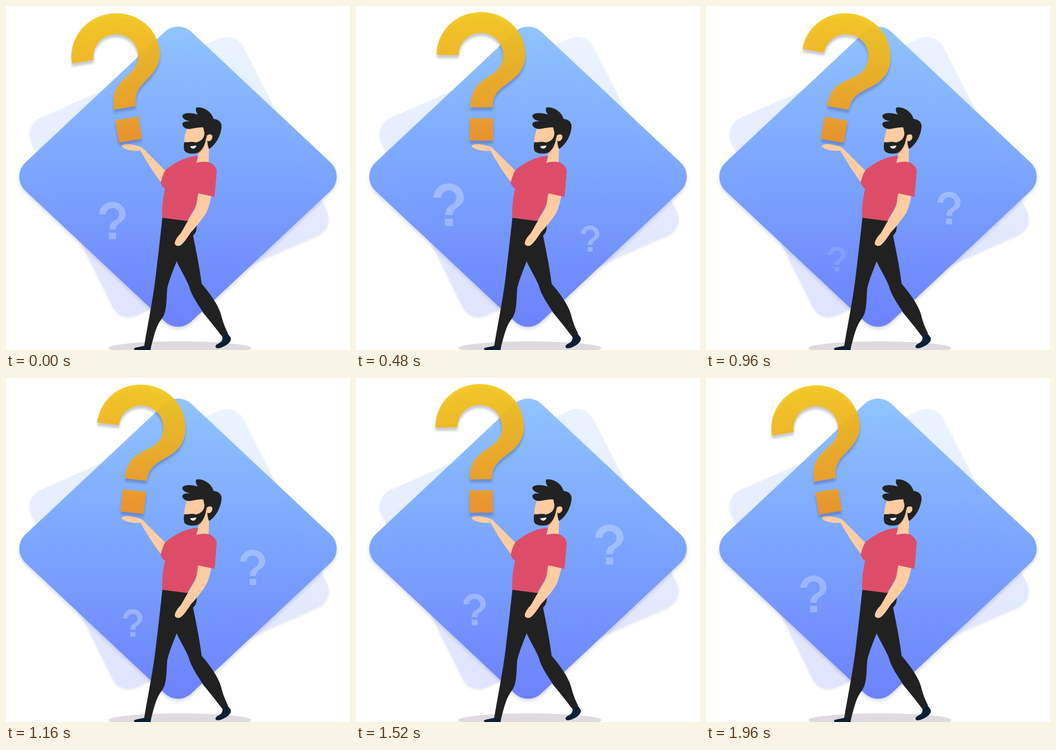
Write an HTML page with a canvas that moves like this. It is 640 px wide and 640 px high and loops after 2 s.

```html
<!DOCTYPE html>
<html lang="en">
<head>
<meta charset="utf-8">
<title>Question</title>
<style>
  html, body { margin: 0; width: 100%; height: 100%; overflow: hidden; background: #fff; }
  canvas { display: block; width: 100vmin; height: 100vmin; }
</style>
</head>
<body>
<canvas id="stage" width="640" height="640"></canvas>
<script>
const LOOP = 2000, STEP = 40;
const ctx = document.getElementById('stage').getContext('2d');

const SKIN = '#ffcca1', HAIR = '#222222', SHIRT = '#de4d67', PANTS = '#212121', SHOE = '#0b1f35';

// Question mark, origin at the pivot below its dot
const mark = new Path2D(
  'M-82.2 -169.5 C-82.2 -215 -45.5 -249.3 0 -249.3 C45.5 -249.3 82.5 -215 82.5 -170 ' +
  'C82.5 -148 72 -134 57 -122.5 C40 -109 22 -101 21.5 -72 L-19.5 -72 ' +
  'C-19.5 -99 -11 -110 0 -119 C18 -134 41.5 -140 41.5 -169.5 ' +
  'C41.5 -192.5 23 -210.5 0 -210.5 C-23 -210.5 -41.2 -192.5 -41.2 -169.5 Z ' +
  'M-21 -51.6 H22.7 V-10 H-21 Z');
const MARK_H = 239.3, MARK_MID = -129.7;

const figure = [
  // shoes and trousers
  [SHOE, 'M238 637 C244 634 251 634 258 632 L270 633 L269 640 L239 640 Z'],
  [SHOE, 'M402 614 L412 609 L418 617 C420 623 414 629 406 633 C399 637 392 638 390 635 C389 631 393 629 397 627 C402 624 404 619 402 614 Z'],
  [PANTS, 'M291 393 L338 399 C345 400 355 402 355 408 C355 417 353 423 348 427 C353 452 360 485 364 517 ' +
    'C379 534 395 556 400 574 C404 590 408 599 413 609 L402 615 C389 598 378 584 367 571 ' +
    'C356 553 344 537 340 520 C333 503 324 490 317.5 475 C311 492 304 508 300 525 ' +
    'C298 548 300 569 289 583 C280 595 277 607 270 634 L257 633 C263 596 271 558 277 515 C282 475 287 430 291 393 Z'],
  // raised arm
  [SKIN, 'M215 261 C217 256 228 256 236 258 C243 260 250 261 254 264 L297 307 L289 329 C274 309 262 290 250 269 C239 271 221 268 215 261 Z'],
  // neck and face
  [SKIN, 'M338 226 L368 224 L374 240 L378 252 L377 294 L353 294 C356 287 358 279 358 271 C345 275 335 265 331.5 253 C332 242 335 232 338 226 Z'],
  ['#e98f7c', 'M357 273 C362 270 366 266 368 262 C366 267 361 274 358 275 Z'],
  [SHIRT, 'M297 305 C314 291 337 279 357 279 C356 284 355 288 354 292 C362 289 374 289 380 291.5 ' +
    'C388 296 392 302 392 308 L388 355 L358 349 L357 362 C353 374 345 386 337 400 L290.5 394 ' +
    'C290 375 292 357 296 340 C292 338 289 333 287.5 329 C290 321 292 312 297 305 Z'],
  // lowered arm
  [SKIN, 'M358 348.5 L382 354 C379 367 376 380 370 389 C362 400 353 412 344 421 C338 430 331 441 325 445 ' +
    'C320 448 314 446 314 441 C315 435 319 429 325 423 C333 410 342 392 350 380 C356 371 355 358 358 348.5 Z'],
  // hair, ear, beard, smile
  [HAIR, 'M354 189 C368 186 384 199 386 210 C398 211 402 219 401 226 C399 243 390 258 378 266 ' +
    'C375 262 374 250 375 246 C372 245 370 241 370 240 L367 226 C358 225 350 228 341 229 ' +
    'C332 228 328 224 328 219 C330 214 338 215 342 214 C333 213 328 209 328 204 C332 197 348 199 357 202 C354 198 352 193 354 189 Z'],
  [SKIN, 'M373 242 C377 237 384 238 384 243 C384 249 379 253 375 251 Z'],
  [HAIR, 'M332 253 C338 255 344 251 353 254 C363 252 369 246 369 237 L373 240 C372 255 367 267 357 273 C348 276 334 275 331.5 268 C330 262 331 257 332 253 Z'],
  ['#ffffff', 'M342.5 261 C347 261 351 259 354.5 260 C352 267 345 267 342.5 261 Z']
].map(([color, d]) => [color, new Path2D(d)]);

function fade(y0, y1, ...colors) {
  const g = ctx.createLinearGradient(0, y0, 0, y1);
  colors.forEach((c, i) => g.addColorStop(i / (colors.length - 1), c));
  return g;
}

function roundedQuad(points, r) {
  const p = new Path2D(), [a, b] = points;
  p.moveTo((a[0] + b[0]) / 2, (a[1] + b[1]) / 2);
  for (let i = 1; i <= 4; i++) p.arcTo(...points[i % 4], ...points[(i + 1) % 4], r);
  p.closePath();
  return p;
}

function shadow(color, blur, dy) {
  ctx.shadowColor = color;
  ctx.shadowBlur = blur;
  ctx.shadowOffsetY = dy;
}

const backTile = roundedQuad([[32.5, 222.3], [426.7, 48.1], [612.2, 412], [212.8, 588]], 33);
const frontTile = roundedQuad([[320, 25], [632, 317.5], [320, 610], [8, 317.5]], 36);
const backFill = fade(56, 578, '#eaf3ff', '#e0e4ff');
const frontFill = fade(38, 597, '#8cc2ff', '#76a2ff', '#677dff');
const markFill = fade(-249, -10, '#f3c718', '#f29422');

function drawScene() {
  ctx.fillStyle = '#fff';
  ctx.fillRect(0, 0, 640, 640);

  ctx.save();
  shadow('rgba(60,70,130,.13)', 4, 2);
  ctx.fillStyle = backFill;
  ctx.fill(backTile);
  shadow('rgba(60,70,130,.22)', 6, 4);
  ctx.globalAlpha = 0.95;
  ctx.fillStyle = frontFill;
  ctx.fill(frontTile);
  ctx.restore();
}

function drawFigure() {
  ctx.fillStyle = '#dfdae0';
  ctx.beginPath();
  ctx.ellipse(323.5, 636.5, 133, 12.5, 0, 0, Math.PI * 2);
  ctx.fill();
  for (const [color, path] of figure) {
    ctx.fillStyle = color;
    ctx.fill(path);
  }
}

function drawSmallMark(x, y, h, alpha) {
  if (alpha <= 0) return;
  const s = h / MARK_H;
  ctx.save();
  ctx.globalAlpha = 0.28 * alpha;
  ctx.translate(x, y);
  ctx.scale(s * 1.03, s);
  ctx.translate(0, -MARK_MID);
  ctx.fillStyle = '#fff';
  ctx.fill(mark);
  ctx.restore();
}

const clamp = v => Math.max(0, Math.min(1, v));
const since = (t, birth) => (t - birth + LOOP) % LOOP;
const visibility = age => Math.min(clamp(age / 220), clamp((1930 - age) / 160));

function drawFloaters(t) {
  const a = since(t, 860), u = (a - 100) / 1680, bend = u * (1 - u);
  drawSmallMark(243.5 - 80 * u + 17 * bend, 470.5 - 110 * u - 14 * bend, 47 + 36 * u, visibility(a));
  const b = since(t, 40), v = (b - 280) / 1360;
  drawSmallMark(430 + 47 * v, 451.5 - 160.5 * v, 45 + 33 * v, visibility(b));
}

function drawBigMark(t) {
  // Even swing between -10 and 10 degrees
  const phase = ((t + 20) % LOOP) / 1000;
  const angle = -10 + 20 * (phase < 1 ? phase : 2 - phase);
  ctx.save();
  shadow('rgba(30,30,50,.26)', 4, 6);
  ctx.globalAlpha = 0.92;
  ctx.translate(232.5, 260.5);
  ctx.rotate(angle * Math.PI / 180);
  ctx.fillStyle = markFill;
  ctx.fill(mark);
  ctx.restore();
}

const start = performance.now();

function render() {
  const t = Math.floor(((performance.now() - start) % LOOP) / STEP) * STEP;
  drawScene();
  drawFloaters(t);
  drawFigure();
  drawBigMark(t);
  requestAnimationFrame(render);
}
render();
</script>
</body>
</html>
```
